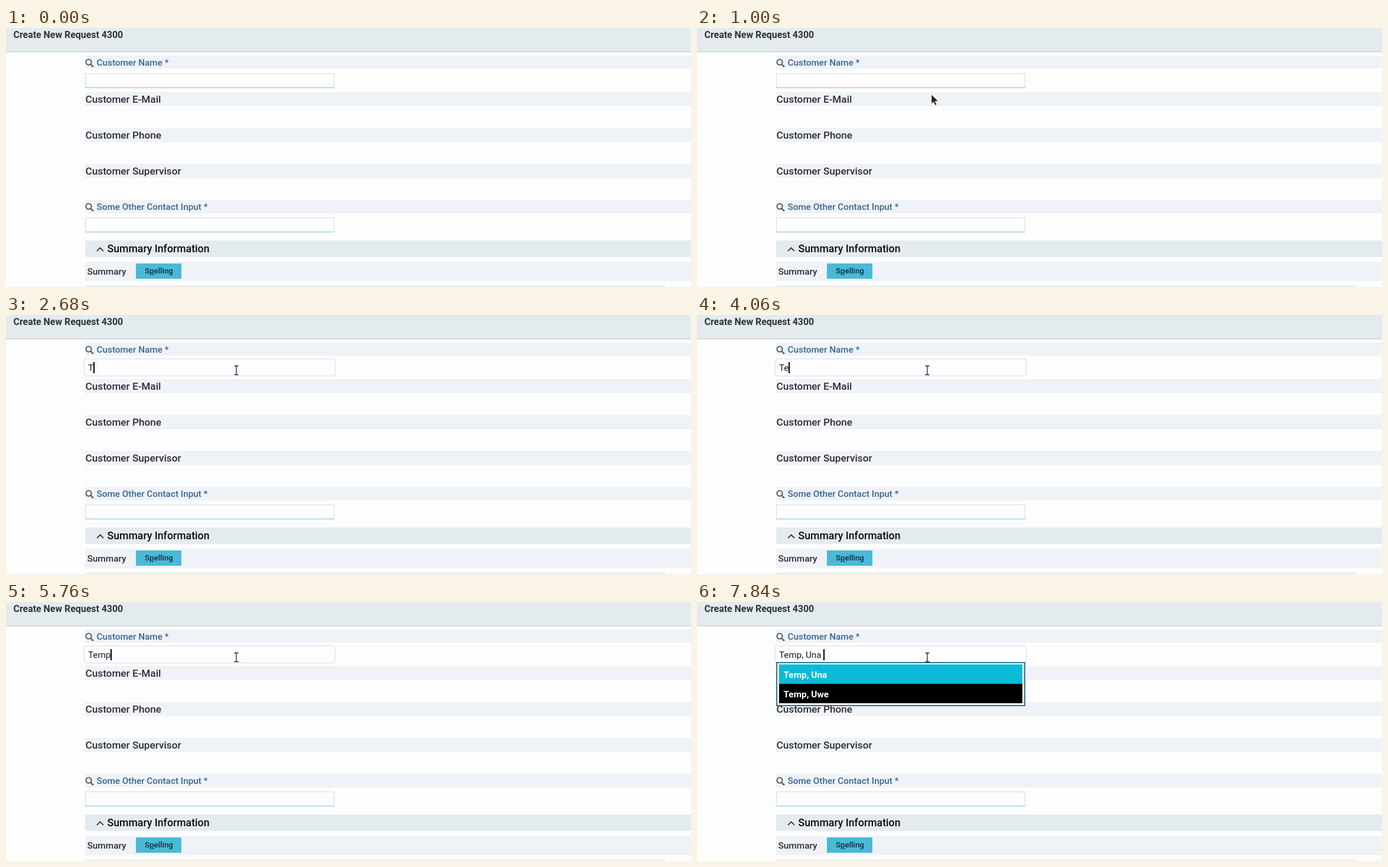
An HTML page for the animation above (8 s loop, 1160 by 440 pixels).

```html
<!DOCTYPE html>
<html lang="en">
<head>
<meta charset="utf-8">
<title>Create New Request</title>
<style>
  html, body { margin: 0; width: 100%; height: 100%; overflow: hidden; background: #fdfdfd; }
  svg { display: block; font-family: Roboto, "Noto Sans", sans-serif; }
  text { white-space: pre; }
  .title { font-size: 15.9px; font-weight: 700; fill: #30343a; }
  .label { font-size: 17.2px; font-weight: 500; fill: #2c2e32; }
  .lookup { font-size: 15.3px; font-weight: 500; fill: #3a6692; }
  .section { font-size: 17.7px; font-weight: 500; fill: #0c0c0e; }
  .summary { font-size: 15.4px; font-weight: 500; fill: #2c2e32; }
  .button { font-size: 13.3px; font-weight: 500; fill: #10303c; }
  .typed { font-size: 15.2px; fill: #1c1c1e; }
  .item { font-size: 15.4px; font-weight: 700; fill: #fff; }
  .band { fill: #eff2f6; }
  .strong { fill: #e4ebef; }
  .line { fill: none; stroke: #d3dae0; }
  .under { stroke: #7cc4d8; }
  .icon { fill: none; stroke: #484a4e; stroke-width: 1.8; }
</style>
</head>
<body>
<svg width="1160" height="440" viewBox="0 0 1160 440">
  <defs>
    <g id="lens" class="icon">
      <circle cx="140" cy="58" r="4.6"/>
      <path d="M143.4 61.4l2.6 2.6M145 65h3.4"/>
    </g>
    <g id="field">
      <path class="line" d="M134.5 101.5v-24h421v24"/>
      <path class="under" d="M134 101.5h422"/>
    </g>
  </defs>

  <rect class="strong" width="1160" height="40"/>
  <path d="M0 40.5h1160" stroke="#bcc4c8"/>
  <text class="title" x="12.5" y="17">Create New Request 4300</text>

  <g class="band">
    <rect x="134" y="47" width="1026" height="22"/>
    <rect x="134" y="109" width="1026" height="24"/>
    <rect x="134" y="170" width="1026" height="24"/>
    <rect x="134" y="231" width="1026" height="24"/>
    <rect x="134" y="292" width="1026" height="23"/>
    <rect x="134" y="397" width="1026" height="33"/>
  </g>
  <rect class="strong" x="134" y="361" width="1026" height="28"/>

  <use href="#lens"/>
  <use href="#lens" y="245"/>
  <text class="lookup" x="153.5" y="63.5">Customer Name *</text>
  <text class="lookup" x="153.5" y="308.5">Some Other Contact Input *</text>
  <text class="label" x="134.5" y="126.5">Customer E-Mail</text>
  <text class="label" x="134.5" y="187.5">Customer Phone</text>
  <text class="label" x="134.5" y="248.5">Customer Supervisor</text>
  <use href="#field" id="idle"/>
  <use href="#field" y="245"/>

  <path d="M154 379l5.5-5.5 5.5 5.5" fill="none" stroke="#202022" stroke-width="1.7"/>
  <text class="section" x="171.5" y="381">Summary Information</text>
  <text class="summary" x="137.5" y="419">Summary</text>
  <rect x="220" y="400" width="77" height="26" fill="#4ab9d7"/>
  <text class="button" x="235" y="417">S<tspan text-decoration="underline">p</tspan>elling</text>
  <path class="line" d="M134.5 440v-1.5h981v1.5"/>

  <g id="focused">
    <rect x="132.5" y="74.5" width="425" height="29" rx="4" fill="#fdfdfd" stroke="#e6eaf2" stroke-width="2"/>
    <text class="typed" id="typed" x="139" y="95"></text>
    <path id="caret" d="M0 80v19" stroke="#000" stroke-width="2"/>
  </g>

  <g id="popup">
    <rect x="135" y="103" width="420" height="73" fill="#fdfdfd" stroke="#39708c" stroke-width="2"/>
    <rect x="139" y="106" width="412" height="66"/>
    <rect id="highlight" x="139" y="106" width="412" height="33" fill="#0bbad6"/>
    <text class="item" x="146.5" y="129">Temp, Una</text>
    <text class="item" x="146.5" y="162">Temp, Uwe</text>
  </g>

  <path id="arrow" d="M0 0v16l3.7-3.5 2.7 6 2.6-1.2-2.7-5.8h5.2z" fill="#202022" stroke="#f4f4f4" stroke-width=".8"/>
  <path id="beam" d="M-3.5-7.5h2.5l1 1 1-1h2.5M0-6.5v13M-3.5 7.5h2.5l1-1 1 1h2.5" fill="none" stroke="#202022" stroke-width="1.3"/>
</svg>
<script>
const LOOP = 8000;
const $ = id => document.getElementById(id);
const [idle, focused, typed, caret, popup, highlight, arrow, beam] =
  ["idle", "focused", "typed", "caret", "popup", "highlight", "arrow", "beam"].map($);

// Pointer waypoints: time, x, y
const path = [[20, 30, 445], [300, 124, 401], [820, 385, 150], [1000, 397, 113], [1240, 390, 94]];
// Contents of the field: start time, text
const typing = [[0, ""], [2560, "T"], [3400, "Te"], [4400, "Tem"], [5200, "Temp"], [7440, "Temp, Una "]];

const show = (el, on) => el.style.display = on ? "" : "none";
const ramp = (t, start, length) => Math.min(1, Math.max(0, (t - start) / length));

function pointer(t) {
  const next = path.findIndex(p => p[0] > t);
  if (next < 0) return path.at(-1).slice(1);
  const a = path[Math.max(0, next - 1)], b = path[next];
  const k = ramp(t, a[0], b[0] - a[0] || 1);
  return [a[1] + (b[1] - a[1]) * k, a[2] + (b[2] - a[2]) * k];
}

function draw(t) {
  const [x, y] = pointer(t);
  const overField = y < 102;
  for (const shape of [arrow, beam]) shape.setAttribute("transform", `translate(${x} ${y})`);
  show(arrow, t >= 20 && !overField);
  show(beam, overField);

  const active = t >= 1720;
  show(focused, active);
  show(idle, !active);
  typed.textContent = typing.findLast(entry => entry[0] <= t)[1];
  const width = active && typed.textContent ? typed.getComputedTextLength() : 0;
  caret.setAttribute("transform", `translate(${Math.round(140 + width)} 0)`);

  popup.style.opacity = ramp(t, 6600, 120);
  highlight.style.opacity = ramp(t, 7440, 200);
}

const start = performance.now();
function tick() {
  draw((performance.now() - start) % LOOP);
  requestAnimationFrame(tick);
}
tick();
</script>
</body>
</html>
```
